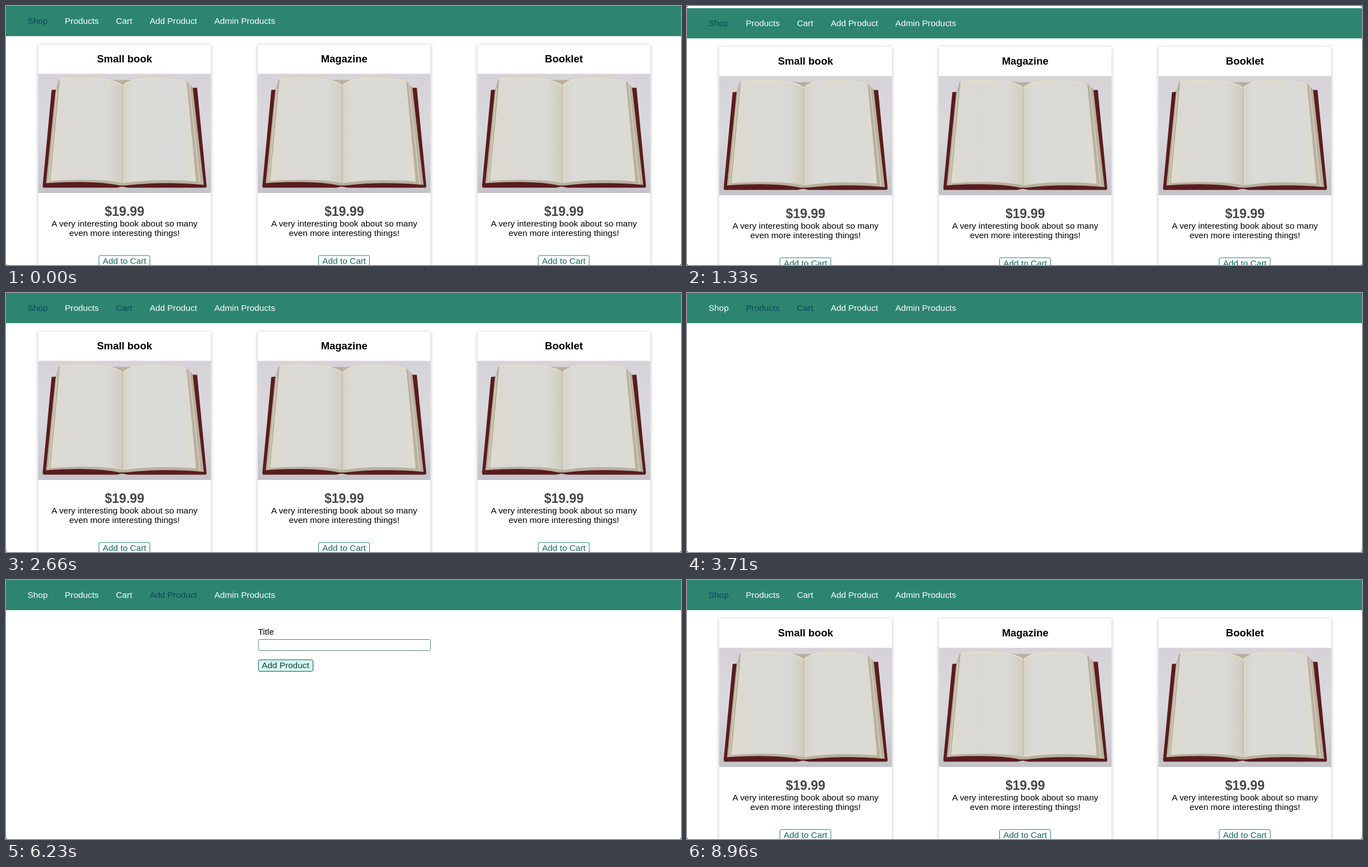
An HTML page that plays this animation: 1206x464 px, repeating every 9.59 s.

```html
<!DOCTYPE html>
<html lang="en">
<head>
<meta charset="utf-8">
<title>Shop</title>
<style>
html, body { margin: 0; width: 100%; height: 100%; overflow: hidden; background: #fff; }
svg { display: block; font: 15.4px "Liberation Sans", Arial, sans-serif; }
.mid { text-anchor: middle; }
.nav { fill: #fff; }
.nav.on { fill: #0a4860; }
.card { fill: #fff; filter: drop-shadow(0 1.5px 3px rgba(0, 0, 0, .26)); }
.title { font-size: 18.48px; font-weight: bold; }
.price { font-size: 23.1px; font-weight: bold; fill: #464646; }
.btn rect { fill: #fff; stroke: #1f7a69; }
.btn text { fill: #11695a; }
.btn.on rect, .submit { fill: #d8fcf5; stroke: #0c4a3f; }
</style>
</head>
<body>
<svg width="1206" height="464" viewBox="0 0 1206 464">
  <defs>
    <linearGradient id="wall" x2="0" y2="1">
      <stop stop-color="#d5d3d8"/><stop offset=".5" stop-color="#dad9de"/><stop offset="1" stop-color="#c4c3c9"/>
    </linearGradient>
    <linearGradient id="left">
      <stop stop-color="#dedbcd"/><stop offset=".2" stop-color="#dad9d4"/><stop offset=".8" stop-color="#d9d9d6"/><stop offset="1" stop-color="#d0ccbd"/>
    </linearGradient>
    <linearGradient id="right">
      <stop stop-color="#d6d3c5"/><stop offset=".15" stop-color="#dbdbd7"/><stop offset=".8" stop-color="#d9d9d6"/><stop offset="1" stop-color="#dfdccd"/>
    </linearGradient>
    <g id="book">
      <path fill="url(#wall)" d="M0 0H308.5V213.5H0Z"/>
      <path fill="#5a1c1e" d="M24 29L34 28 150 195 275 25 284 25 301 202 299 204 160 204 150 202 140 204 9 204 8 201Z"/>
      <path fill="#b9b09f" d="M37 10L31 30 14 196Q100 190 145 200L156 200Q220 192 296 199L276 24 264 12Z"/>
      <path fill="none" stroke="#d2cbbb" stroke-width="2" d="M34 26L19 194M270 19L289 197"/>
      <path fill="url(#left)" d="M39 9Q60 6 92 7 138 8 151 21L151 196Q110 186 22 192Z"/>
      <path fill="url(#right)" d="M151 21Q162 8 196 7 238 6 265 13L282 193Q205 187 151 196Z"/>
      <path fill="none" stroke="#e4dfc8" stroke-width="2" d="M39 10Q60 7 92 8 138 9 151 22 162 9 196 8 238 7 265 14"/>
      <path fill="none" stroke="#b7b09d" d="M151 20V196M22 193Q110 187 151 197 205 188 282 194"/>
    </g>
  </defs>
  <g id="page">
    <path fill="#2d856f" d="M0 0H1206V54H0Z"/>
    <g id="menu"></g>
    <g id="cards"></g>
    <g id="form">
      <text x="450.2" y="98">Title</text>
      <rect x="451" y="106.5" width="307.5" height="20" rx="3" fill="#fff" stroke="#4a8578"/>
      <rect class="submit" x="451" y="143" width="97.5" height="20.5" rx="3"/>
      <text x="457" y="158" fill="#0c3f36">Add Product</text>
    </g>
  </g>
  <path fill="#333" d="M0 0H2L0 2ZM1206 0V2L1204 0ZM0 464V462L2 464ZM1206 464H1204L1206 462Z"/>
</svg>
<script>
const LOOP = 9590, STEP = 70;
const SHOP = 0, PRODUCTS = 1, CART = 2, ADD = 3, ADMIN = 4, NONE = -1;
const $ = id => document.getElementById(id);

const links = [["Shop", 38.5], ["Products", 105], ["Cart", 196.4], ["Add Product", 256.7], ["Admin Products", 372.2]];
$("menu").innerHTML = links.map(([label, x]) => `<text class="nav" x="${x}" y="32">${label}</text>`).join("");

const card = (title, i) => `<g transform="translate(${57.5 + i * 392.5} 0)">
  <rect class="card" y="69" width="308.5" height="430" rx="1.5"/>
  <text class="mid title" x="154.2" y="101">${title}</text>
  <use href="#book" y="121.5"/>
  <text class="mid price" x="154.2" y="375.5">$19.99</text>
  <text class="mid" x="154.2" y="395">A very interesting book about so many</text>
  <text class="mid" x="154.2" y="412">even more interesting things!</text>
  <g class="btn">
    <rect x="108.5" y="447" width="91" height="20.5" rx="2.5"/>
    <text class="mid" x="154.2" y="462">Add to Cart</text>
  </g></g>`;
$("cards").innerHTML = ["Small book", "Magazine", "Booklet"].map(card).join("");

// start time, open page, hovered link
const states = [
  [0, SHOP, NONE], [2660, SHOP, CART], [3290, CART, CART], [3710, CART, PRODUCTS],
  [5040, PRODUCTS, PRODUCTS], [5390, PRODUCTS, ADMIN], [5530, PRODUCTS, ADD],
  [6230, ADD, ADD], [6860, ADD, ADMIN], [7700, ADD, NONE], [7770, ADD, SHOP], [8330, SHOP, SHOP]
];
const navs = document.querySelectorAll(".nav");
const magazineBtn = document.querySelectorAll(".btn")[1];

// overscroll pull, then spring back
function bounce(t) {
  if (t < 910 || t >= 1610) return 0;
  if (t < 1120) return t < 980 ? 2 : 3;
  const step = Math.floor(t / STEP) * STEP;
  return Math.round(10 * ((1610 - step) / 490) ** 1.5);
}

function draw(now) {
  const t = now % LOOP;
  const [, open, hover] = states.findLast(s => s[0] <= t);
  navs.forEach((nav, i) => nav.classList.toggle("on", i === open || i === hover));
  $("cards").style.display = open === SHOP || open === PRODUCTS ? "" : "none";
  $("form").style.display = open === ADD ? "" : "none";
  magazineBtn.classList.toggle("on", t >= 8890 && t < 8960);
  $("page").setAttribute("transform", `translate(0 ${bounce(t)})`);
}

const start = performance.now();
function tick() {
  draw(performance.now() - start);
  requestAnimationFrame(tick);
}
tick();
</script>
</body>
</html>
```
